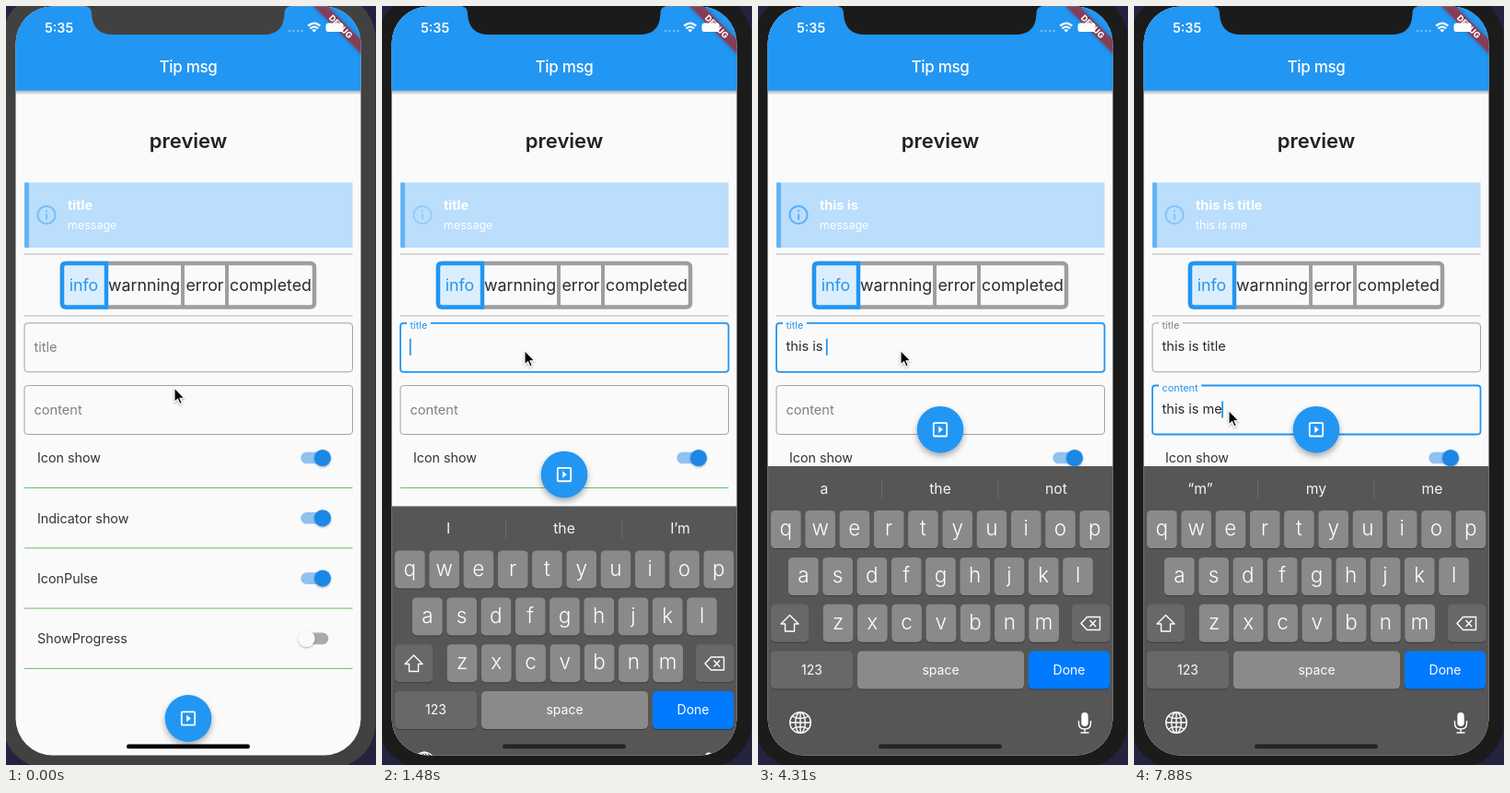
An HTML page for the animation above (8000 ms loop, 402x823 px).

```html
<!DOCTYPE html>
<html lang="en">
<head>
<meta charset="utf-8">
<title>Tip msg</title>
<style>
  html, body { margin: 0; width: 100%; height: 100%; overflow: hidden; background: #24233f; }
  svg { display: block; width: 100%; height: 100%; }
  text { font-family: Inter, Roboto, sans-serif; white-space: pre; }
</style>
</head>
<body>
<svg id="stage" viewBox="0 0 402 823"></svg>
<script>
const BLUE = '#2196f3', GREY = '#9e9e9e', INK = '#2b2b2b';
const LOOP = 8000, STEP = 148.6, START = 290;

// Markup helpers
const rect = (x, y, w, h, fill, r = 0, more = '') =>
  `<rect x="${x}" y="${y}" width="${w}" height="${h}" rx="${r}" fill="${fill}" ${more}/>`;
const text = (x, y, size, fill, str, more = '') =>
  `<text x="${x}" y="${y}" font-size="${size}" fill="${fill}" ${more}>${str}</text>`;
const mid = (x, y, size, fill, str, more = '') =>
  text(x, y, size, fill, str, `text-anchor="middle" ${more}`);
const line = (x1, y1, x2, y2, color, w = 1) =>
  `<path d="M${x1} ${y1}L${x2} ${y2}" stroke="${color}" stroke-width="${w}"/>`;

function statusBar() {
  const dots = [308, 312.5, 317, 321.5]
    .map(x => `<circle cx="${x}" cy="27" r="1.3" fill="#fff" opacity=".35"/>`).join('');
  const wifi = `<g fill="none" stroke="#fff" stroke-width="2.1">
    <path d="M328.2 21.6Q334.8 15.8 341.4 21.6M330.5 24.4Q334.8 20.6 339.1 24.4"/></g>
    <path d="M332.4 26.2Q334.8 24 337.2 26.2L334.8 28.7Z" fill="#fff"/>`;
  const ribbon = `<g transform="translate(385.5 .5) rotate(45)">` +
    rect(-40, 25.4, 80, 10.9, '#b71c1c', 0, 'fill-opacity=".63" filter="url(#soft)"') + '</g>';
  const debug = `<g transform="translate(385.5 .5) rotate(45)">` +
    mid(0, 34.2, 9.1, '#fff', 'DEBUG', 'font-weight="800"') + '</g>';
  return text(42, 28.6, 14.3, '#fff', '5:35', 'font-weight="600"') + dots + wifi +
    ribbon + rect(347.5, 18.6, 19, 9.4, '#fff', 2.8) + debug;
}

function banner() {
  return rect(20, 191.5, 356.5, 70.5, '#badefc') + rect(20, 191.5, 5, 70.5, '#64b5f6') +
    `<g id="icon"><circle cx="44" cy="226.5" r="9.6" fill="none" stroke="#54aef7" stroke-width="2"/>` +
    rect(43, 221.2, 2.1, 2.1, '#54aef7') + rect(43, 225.4, 2.1, 6.4, '#54aef7') + '</g>' +
    text(67, 221, 14.5, '#fff', '', 'id="tipTitle" font-weight="700"') +
    text(67, 242, 12.5, '#fff', '', 'id="tipBody"');
}

function tabs() {
  const names = [['warnning', 150], ['error', 216], ['completed', 287.5]];
  return rect(61, 279, 274, 47.5, 'none', 4, `stroke="${GREY}" stroke-width="4.5"`) +
    line(192, 279, 192, 326, GREY, 4) + line(240, 279, 240, 326, GREY, 4) +
    '<path d="M109 279H65Q61 279 61 283V322.5Q61 326.5 65 326.5H109Z" ' +
    `fill="#dceefd" stroke="${BLUE}" stroke-width="4.5"/>` +
    mid(84.5, 309, 17.8, BLUE, 'info') +
    names.map(([s, x]) => mid(x, 309, 17.8, INK, s)).join('');
}

function field(id, y) {
  return `<path id="${id}Line" fill="none"/><text id="${id}Label" font-size="14.6">${id}</text>` +
    text(30.5, y + 30.4, 14.6, INK, '', `id="${id}Text"`) +
    rect(30, y + 17, 1.8, 18, BLUE, 0, `id="${id}Caret"`);
}

function switches() {
  return ['Icon show', 'Indicator show', 'IconPulse', 'ShowProgress'].map((name, i) => {
    const y = 490 + i * 65.3, on = i < 3;
    return text(34, y + 5.2, 14.3, '#333', name) +
      rect(320.3, y - 6.3, 30, 12.6, on ? '#8fc1f1' : '#a9a9a9', 6.3) +
      `<circle cx="${on ? 344 : 326.5}" cy="${y}" r="9.1" fill="${on ? '#1e88e5' : '#fafafa'}" filter="url(#knob)"/>` +
      line(20, y + 32.5, 376.5, y + 32.5, '#66bf6a');
  }).join('');
}

function fab() {
  return `<g id="fab"><circle r="25.4" fill="${BLUE}" filter="url(#lift)"/>` +
    rect(-7.2, -7.2, 14.4, 14.4, 'none', 1, 'stroke="#fff" stroke-width="1.8"') +
    '<path d="M-1.8-3.7V3.7L2.9 0Z" fill="#fff"/></g>';
}

function keyboard() {
  const LIGHT = '#8a8a8a', DARK = '#686868', W = 32.7;
  const key = (x, y, w, fill) =>
    rect(x, y + 1, w, 41, '#3b3b3b', 4.6) + rect(x, y, w, 41, fill, 4.6);
  const row = (chars, x0, y) => [...chars].map((c, i) => {
    const x = x0 + i * 37.27;
    return key(x, y, W, LIGHT) + mid(x + W / 2, y + 27.3, 22.5, '#fff', c, 'font-weight="300"');
  }).join('');
  const cap = (x, w, fill, s) =>
    key(x, 699.5, w, fill) + mid(x + w / 2, 724.5, 14, '#fff', s);
  const slots = [72, 198, 324].map((x, i) =>
    mid(x, 528.8, 15.7, '#f4f4f4', '', `id="hint${i}"`)).join('');
  const icons = `<g fill="none" stroke="#fff" stroke-width="1.4" stroke-linejoin="round">
    <path d="M34.5 660.5L44 670H39.5V678H29.5V670H25Z"/>
    <path d="M351 669.5L357.5 662.5H371.5V676.5H357.5Z"/>
    <path d="M360.5 666L367 673M367 666L360.5 673"/>
    <circle cx="46" cy="777" r="11.3"/><ellipse cx="46" cy="777" rx="5.3" ry="11.3"/>
    <path d="M46 765.7V788.3M34.7 777H57.3M37 770Q46 775 55 770M37 784Q46 779 55 784"/>
    <path d="M348.5 775V778Q348.5 784 355 784T361.5 778V775M355 784V788M350.5 788H359.5"/></g>` +
    rect(351.3, 766, 7.4, 15, '#fff', 3.7);
  return '<g id="keyboard">' + rect(10, 499, 376, 330, '#565656') + slots +
    line(134.5, 513, 134.5, 534, '#6d6d6d') + line(261, 513, 261, 534, '#6d6d6d') +
    row('qwertyuiop', 14, 547) + row('asdfghjkl', 33, 598) + row('zxcvbnm', 70.7, 648.7) +
    key(14, 648.7, 41, DARK) + key(341, 648.7, 41, DARK) +
    cap(14, 89, DARK, '123') + cap(108, 181, LIGHT, 'space') + cap(294, 88, '#007aff', 'Done') +
    icons + '</g>';
}

const stage = document.getElementById('stage');
stage.innerHTML = `<defs>
  <clipPath id="screen">${rect(10.5, .5, 375, 812, '#000', 40)}</clipPath>
  <linearGradient id="edge" x2="0" y2="1"><stop stop-color="#000" stop-opacity=".32"/>
    <stop offset="1" stop-color="#000" stop-opacity="0"/></linearGradient>
  <filter id="soft" x="-20%" y="-80%" width="140%" height="260%">
    <feDropShadow dx="0" dy="0" stdDeviation="2" flood-opacity=".4"/></filter>
  <filter id="knob" x="-50%" y="-50%" width="200%" height="200%">
    <feDropShadow dx="0" dy="1" stdDeviation="1" flood-opacity=".35"/></filter>
  <filter id="lift" x="-50%" y="-50%" width="200%" height="200%">
    <feDropShadow dx="0" dy="3.5" stdDeviation="3.2" flood-opacity=".32"/></filter></defs>` +
  rect(0, 0, 402, 823, '#24233f') + rect(-4, -14, 405.5, 841, '#414141', 50, 'id="body"') +
  '<g clip-path="url(#screen)">' + rect(10, 0, 376, 823, '#fafafa') +
  rect(10, 91.5, 376, 5, 'url(#edge)') + rect(10, 0, 376, 91.8, BLUE) +
  mid(198, 72.4, 17, '#fff', 'Tip msg', 'font-weight="500" letter-spacing="-.3"') +
  mid(198, 153.8, 22, '#212121', 'preview', 'font-weight="600"') + banner() +
  line(20, 269, 376.5, 269, '#b2b2b2') + tabs() + line(20, 336, 376.5, 336, '#b2b2b2') +
  field('title', 343.8) + field('content', 411.5) + switches() + fab() + keyboard() +
  rect(131, 800.6, 134, 4.6, '#000', 2.3, 'id="home"') + statusBar() + '</g>' +
  '<path id="notch" d="M86 0Q93 1 93 8Q94 31 116 31H280Q302 31 302.500 8Q302.500 1 309 0Z"/>' +
  `<path id="mouse" d="M0 0V15.500L3.600 12.200L6 17.600L8.300 16.600L6 11.300H11Z"
    fill="#000" stroke="#fff" stroke-width="1.100" filter="url(#knob)"/>`;

const el = {};
stage.querySelectorAll('[id]').forEach(n => el[n.id] = n);
const set = (id, attrs) => { for (const k in attrs) el[id].setAttribute(k, attrs[k]); };
const write = (id, s) => { if (el[id].textContent !== s) el[id].textContent = s; };

const clamp = v => Math.max(0, Math.min(1, v));
const ease = v => { v = clamp(v); return v * v * (3 - 2 * v); };
const mix = (a, b, p) => a + (b - a) * p;

const TAP_TITLE = 1150, TAP_CONTENT = 6050;

// time, typed text, suggestions
const titleKeys = [
  [0, '', 'I|the|I’m'],
  [2220, 't', '“t”|the|to'],
  [2510, 'th', '“th”|the|this'],
  [2810, 'thi', '“thi”|this|think'],
  [3110, 'this', '“this”|this’ll|this’s'],
  [3410, 'this ', 'is|week|morning'],
  [3700, 'this i', '“i”|is|it'],
  [3850, 'this is', '“is”|isn’t|issue'],
  [4150, 'this is ', 'a|the|not'],
  [4445, 'this is t', '“t”|the|to'],
  [4590, 'this is ti', '“ti”|time|tired'],
  [4740, 'this is tit', '“tit”|title|titles'],
  [4890, 'this is titl', '“titl”|title|titles'],
  [5040, 'this is title', '“title”|titled|titles']
];
const contentKeys = [
  [TAP_CONTENT, '', 'I|this|the'],
  [6670, 'th', '“th”|this|the'],
  [6820, 'thi', '“thi”|this|the'],
  [6970, 'this', '“this”|this|the'],
  [7120, 'this ', 'is|this|the'],
  [7270, 'this i', '“i”|this|the'],
  [7415, 'this is', '“is”|this|the'],
  [7715, 'this is m', '“m”|my|me'],
  [7865, 'this is me', '“m”|my|me']
];
const latest = (keys, t) => keys.filter(k => k[0] <= t).pop();

function caretAlpha(age) {
  const p = age % 1000;
  if (p >= 500) return clamp(1 - (p - 500) / 250);
  return age < 500 ? 1 : clamp(p / 250);
}

function drawField(id, y, typed, focused, lift, age) {
  const color = focused ? BLUE : '#a2a2a2';
  write(id + 'Text', typed);
  const scale = mix(1, .75, lift);
  set(id + 'Label', {
    fill: focused ? BLUE : '#808080',
    transform: `translate(30.5 ${y + mix(31, 6, lift)}) scale(${scale})`
  });
  const gap = lift * (el[id + 'Label'].getComputedTextLength() * .75 + 7);
  set(id + 'Line', {
    d: `M${27 + gap} ${y}H373q3.500 0 3.500 3.500v46q0 3.500-3.500 3.500H23.500` +
       'q-3.500 0-3.500-3.500v-46q0-3.500 3.500-3.500H27',
    stroke: color, 'stroke-width': focused ? 1.8 : 1
  });
  const end = typed ? el[id + 'Text'].getComputedTextLength() : 0;
  set(id + 'Caret', { x: 29.8 + end, opacity: focused ? caretAlpha(age) : 0 });
}

function draw(time) {
  const t = time < START ? 0 : START + STEP * Math.floor((time - START + 3) / STEP);
  const title = latest(titleKeys, t), content = latest(contentKeys, t);
  const inTitle = t >= TAP_TITLE && !content;

  const shell = t < 1030 ? '#414141' : '#1b1b1b';
  set('body', { fill: shell });
  set('notch', { fill: shell });
  set('icon', { opacity: .68 + .32 * Math.cos((t - 540) / 1000 * Math.PI) });
  write('tipTitle', title[1] || 'title');
  write('tipBody', content && content[1] || 'message');

  drawField('title', 343.8, title[1], inTitle, ease((t - TAP_TITLE) / 170),
    t - Math.max(title[0], TAP_TITLE));
  drawField('content', 411.5, content ? content[1] : '', !!content,
    ease((t - TAP_CONTENT) / 170), content ? t - content[0] : 0);

  // The keyboard settles exponentially and carries the round button with it.
  const decay = Math.exp(-(t - 1330) / 80), shown = t >= 1325;
  set('keyboard', { transform: `translate(0 ${shown ? 279 * decay : 330})` });
  set('fab', { transform: `translate(198 ${shown ? 459.3 + 313.2 * Math.min(1, decay) : 772.5})` });
  set('home', { fill: t < 1400 ? '#000' : '#242424' });
  (content || title)[2].split('|').forEach((s, i) => write('hint' + i, s));
  set('hint0', { opacity: content && !content[1] && t > 6500 ? .5 : 1 });

  const a = ease((t - 240) / 800), b = ease((t - 5300) / 680);
  const x = mix(mix(183, 155, a), 103, b), y = mix(mix(414, 373.5, a), 438.5, b);
  set('mouse', { transform: `translate(${x} ${y})` });
}

const origin = performance.now();
function tick() {
  draw((performance.now() - origin) % LOOP);
  requestAnimationFrame(tick);
}
tick();
</script>
</body>
</html>
```
